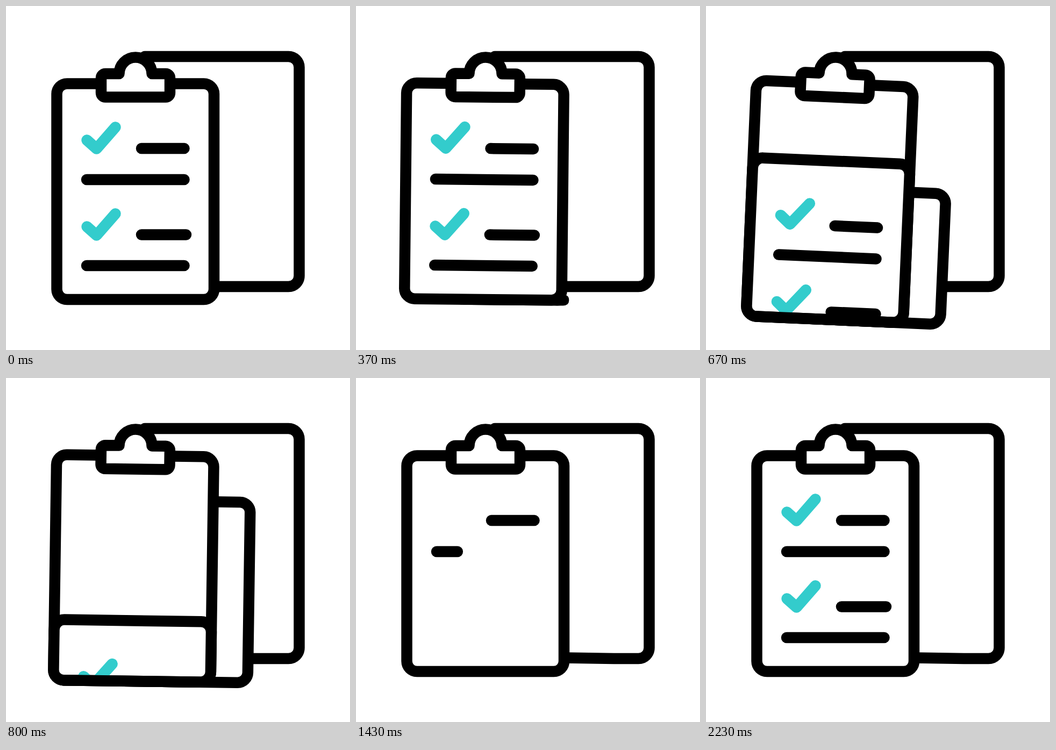
Animation of 640x640 px, one loop 2.5 s. Source, as an HTML page:

```html
<!DOCTYPE html>
<html lang="en">
<head>
<meta charset="utf-8">
<title>Clipboard</title>
<style>
html, body { margin: 0; width: 100%; height: 100%; overflow: hidden; background: #fff; }
svg { display: block; width: 100vw; height: 100vh; }
.ink { stroke: #000; stroke-width: 20.5; fill: #fff; stroke-linecap: round; stroke-linejoin: round; }
.tick { stroke: #3cc; stroke-width: 20.5; fill: none; stroke-linecap: round; stroke-linejoin: round; }
</style>
</head>
<body>
<svg viewBox="0 0 640 640">
  <defs><clipPath id="pageClip"><rect id="clipBox" x="94" y="100" width="293"/></clipPath></defs>
  <path id="back" class="ink"/>
  <g id="swing">
    <rect id="spare" class="ink" x="200" rx="19"/>
    <rect id="board" class="ink" x="94.5" y="144.5" width="292.5" rx="19"/>
    <rect id="page" class="ink" x="94.5" width="292.5" rx="19"/>
    <g clip-path="url(#pageClip)">
      <g id="content">
        <path class="ink" pathLength="1" d="M252 265H331.5"/>
        <path class="ink" pathLength="1" d="M150 323H331.5"/>
        <path class="ink" pathLength="1" d="M252 425.5H335"/>
        <path class="ink" pathLength="1" d="M150 483H331.5"/>
        <path class="tick" pathLength="1" d="M150.5 249.5L168.5 265.5L203.5 225.5"/>
        <path class="tick" pathLength="1" d="M150.5 410.5L168.5 426.5L203.5 386.5"/>
      </g>
    </g>
    <path id="pageFoot" class="ink" style="fill:none"/>
    <path class="ink" d="M185 126H210.5A30.5 30.5 0 0 1 271.5 126H297a8 8 0 0 1 8 8V161.5a8 8 0 0 1 -8 8H185a8 8 0 0 1 -8 -8V134a8 8 0 0 1 8 -8z"/>
  </g>
</svg>
<script>
const LOOP = 2500, TOP = 144.5, BOTTOM = 546, REFILL = 1100;
const el = id => document.getElementById(id);
const set = (node, attrs) => { for (const k in attrs) node.setAttribute(k, attrs[k]); };
const show = (node, on) => { node.style.display = on ? '' : 'none'; };
const clamp = v => Math.max(0, Math.min(1, v));

// Smooth curve through [time, value] keys without overshoot
function track(keys) {
  const n = keys.length;
  const rise = i => (keys[i + 1][1] - keys[i][1]) / (keys[i + 1][0] - keys[i][0]);
  const slope = keys.map((_, i) => {
    if (i === 0 || i === n - 1) return 0;
    const a = rise(i - 1), b = rise(i);
    return a * b > 0 ? 2 * a * b / (a + b) : 0;
  });
  return t => {
    if (t <= keys[0][0]) return keys[0][1];
    if (t >= keys[n - 1][0]) return keys[n - 1][1];
    let i = 0;
    while (t > keys[i + 1][0]) i++;
    const span = keys[i + 1][0] - keys[i][0], u = (t - keys[i][0]) / span, v = 1 - u;
    return v * v * (1 + 2 * u) * keys[i][1] + u * u * (3 - 2 * u) * keys[i + 1][1]
      + span * u * v * (v * slope[i] - u * slope[i + 1]);
  };
}

const angle = track([[0, 0], [275, 4], [505, -5], [675, 2.52], [880, 0]]);
const drop = track([[390, 0], [500, 21], [670, 143], [920, 402]]);
const stretch = track([[390, 0], [500, 24.5], [530, 34], [610, 38], [670, 37.5], [930, 0]]);
const spareTop = track([[360, 546], [500, 460], [670, 341], [955, TOP]]);
const spareRight = track([[360, 387], [440, 456], [1040, 456], [1290, 387]]);
const sag = track([[1040, 0], [1290, -1.6]]);

// Start and end of drawing for each line and tick
const spans = [[1230, 1410], [1385, 1600], [1590, 1720], [1710, 1930], [1930, 2230], [1930, 2230]];
const marks = [...el('content').children];

function draw(t) {
  const refill = t >= REFILL;
  const bottom = BOTTOM + stretch(t);
  const shift = refill ? 0 : drop(t);
  const foot = BOTTOM + Math.min(shift, stretch(t));

  set(el('back'), { d: `M258 94H525.5a20 20 0 0 1 20 20V502a20 20 0 0 1 -20 20H480L387 ${522 + sag(t)}` });
  set(el('swing'), { transform: `rotate(${angle(t)} 240.5 126)` });

  const top = spareTop(t);
  show(el('spare'), t > 360 && t < 1290);
  set(el('spare'), { y: top, width: spareRight(t) - 200, height: Math.max(0, bottom - top) });

  set(el('board'), { height: bottom - TOP });
  const pageOn = !refill && shift > 0 && shift < 401;
  show(el('page'), pageOn);
  set(el('page'), { y: TOP + shift, height: Math.max(0, foot - TOP - shift) });
  show(el('pageFoot'), pageOn);
  set(el('pageFoot'), { d: `M113.5 ${foot}H368` });

  set(el('clipBox'), { height: bottom - 100 });
  set(el('content'), { transform: `translate(0 ${shift})` });
  marks.forEach((mark, i) => {
    const [from, to] = spans[i];
    const part = refill ? clamp((t - from) / (to - from)) : 1;
    show(mark, part > 0 && (refill || shift < 401));
    set(mark, { 'stroke-dasharray': part < 1 ? `${part} 2` : 'none' });
  });
}

const start = performance.now();
function tick(now) {
  draw(Math.max(0, now - start) % LOOP);
  requestAnimationFrame(tick);
}
draw(0);
requestAnimationFrame(tick);
</script>
</body>
</html>
```
